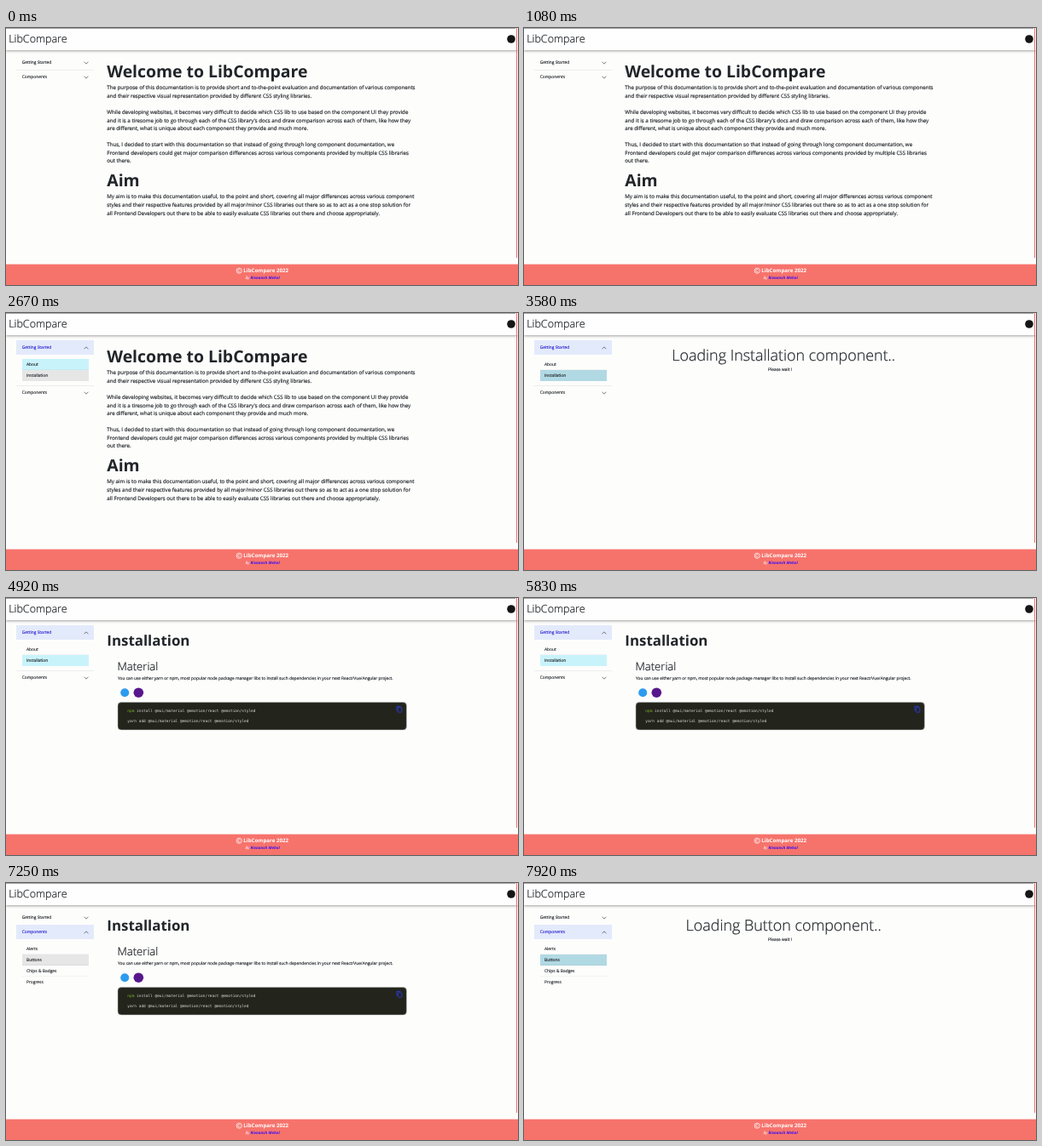
An HTML page for the animation above (8 s loop, 600 by 302 pixels).

```html
<!DOCTYPE html>
<html lang="en">
<head>
<meta charset="utf-8">
<title>LibCompare</title>
<style>
html, body { margin: 0; width: 100%; height: 100%; overflow: hidden; }
body {
  position: relative; background: #fdfdfc; color: #212529;
  font-family: "Open Sans", "Noto Sans", sans-serif; text-rendering: geometricPrecision;
}
.bar {
  position: absolute; left: 0; top: 0; width: 600px; height: 26px;
  background: #fefefe; box-shadow: 0 1px 3px rgba(0, 0, 0, .38);
}
.stage { position: absolute; left: 0; top: 0; width: 600px; height: 302px; }
.body, .small, .light { stroke: #212529; stroke-width: .16; }
.body { font-size: 6.18px; }
.small { font-size: 4.86px; }
.big { font-size: 19.4px; font-weight: 700; }
.title { font-size: 16.9px; font-weight: 700; }
.light { font-weight: 300; stroke-width: .22; }
.mid { text-anchor: middle; }
.code { font: 4.46px "DejaVu Sans Mono", monospace; fill: #dcdcd6; }

.side {
  position: absolute; left: 12px; top: 32px; width: 91px;
  font-size: 4.9px; -webkit-text-stroke: .14px;
}
.first { box-shadow: 0 1px #ededed; }
.head { position: relative; height: 17px; line-height: 18px; padding-left: 6.7px; }
.chev { position: absolute; left: 78.7px; top: 5.5px; width: 6px; height: 6px; }
.chev path { fill: none; stroke: #333; stroke-width: .65; }
.panel { height: 0; overflow: hidden; }
.list { padding: 5px 6px 5px 7px; }
.item { height: 13px; line-height: 14px; padding-left: 5px; }
.item:not(:last-child) { box-shadow: inset 0 -1px rgba(0, 0, 0, .04); }
.ring { position: absolute; left: 0; right: 0; opacity: 0; border-top: 1px dashed #9a9ac6; }
.low { bottom: 0; }
.high { top: 0; }
</style>
</head>
<body>
<div class="bar"></div>

<svg class="stage" viewBox="0 0 600 302" fill="#212529">
  <rect width="597" height="1" fill="#a2a2a2"/>
  <rect x="598" width="1" height="270" fill="#f0716e"/>
  <text class="light" x="3.2" y="16.8" font-size="12.5">LibCompare</text>
  <circle cx="592" cy="13" r="4.8" fill="#151515"/>

  <g id="about">
    <text class="big" x="118.3" y="58">Welcome to LibCompare</text>
    <text class="big" x="118.3" y="185.8">Aim</text>
  </g>

  <g id="wait" class="mid">
    <text id="waitInstall" class="light" x="304.2" y="55.8" font-size="17.9">Loading Installation component..</text>
    <text id="waitButton" class="light" x="304.2" y="55.8" font-size="17.9">Loading Button component..</text>
    <text class="small" x="300" y="68">Please wait !</text>
  </g>

  <g id="install">
    <text class="title" x="118.3" y="55.5">Installation</text>
    <text class="light" x="130.5" y="84.8" font-size="13.1">Material</text>
    <text class="small" x="131" y="96.2">You can use either yarn or npm, most popular node package manager libs to install such dependencies in your next React/Vue/Angular project.</text>
    <circle cx="139.2" cy="111.2" r="5" fill="#2c9bee"/>
    <circle cx="155.3" cy="111.2" r="5.8" fill="#57178c"/>
    <rect x="131" y="122.6" width="338.4" height="32.4" rx="4" fill="#23251d" stroke="#b9b9b5" stroke-width=".5"/>
    <text class="code" x="142.3" y="133.8"><tspan fill="#7fba22">npm</tspan> install @mui/material @emotion/react @emotion/styled</text>
    <text class="code" x="142.3" y="146.4">yarn add @mui/material @emotion/react @emotion/styled</text>
    <g fill="none" stroke="#2c3fe6" stroke-width=".8">
      <rect x="459.4" y="128.8" width="4.4" height="5.4" rx=".5"/>
      <path d="M458 132.8V127.4H462.6"/>
    </g>
  </g>

  <rect y="277.6" width="600" height="24.4" fill="#f6736c"/>
  <g fill="none" stroke="#fff" stroke-width=".75">
    <circle cx="273.2" cy="285.2" r="3.1"/>
    <path d="M274.4 284.3A1.5 1.5 0 1 0 274.4 286.1"/>
  </g>
  <text x="278.3" y="287.2" font-size="6.18" font-weight="700" fill="#fff">LibCompare 2022</text>
  <text class="mid" x="300.7" y="294.5" font-size="4.6" font-style="italic" fill="#fff">By <tspan font-weight="700" fill="#3d12f4">Rivaansh Mehol</tspan></text>
</svg>

<div class="side">
  <div class="first">
    <div class="head" id="startHead">Getting Started
      <svg class="chev" id="startChev" viewBox="0 0 6 6"><path d="M.5 1.7L3 4.2L5.5 1.7"/></svg>
      <i class="ring low" id="startRing"></i>
    </div>
    <div class="panel" id="startPanel"><div class="list">
      <div class="item" id="itemAbout">About</div>
      <div class="item" id="itemInstall">Installation</div>
    </div></div>
  </div>
  <div>
    <div class="head" id="compHead">Components
      <svg class="chev" id="compChev" viewBox="0 0 6 6"><path d="M.5 1.7L3 4.2L5.5 1.7"/></svg>
      <i class="ring high" id="compRingTop"></i>
      <i class="ring low" id="compRing"></i>
    </div>
    <div class="panel" id="compPanel"><div class="list">
      <div class="item" id="itemAlerts">Alerts</div>
      <div class="item" id="itemButtons">Buttons</div>
      <div class="item">Chips &amp; Badges</div>
      <div class="item">Progress</div>
    </div></div>
  </div>
</div>

<script>
const LOOP = 8000;
const OPEN = 1310, HOVER = 2250, PICK = 2980, LOADED = 3920, LEAVE = 4100;
const SWITCH = 6445, NEXT = 6640, PRESS = 7450;
const NONE = 'rgba(0,0,0,0)', ACTIVE = '#c9f3fb', GREY = '#e6e6e6', TEAL = '#b1d9e4';
const HEAD = '#e3eafb', INK = '#212529', BLUE = '#2a23cf';
const $ = id => document.getElementById(id);

// Paragraph lines; an empty string leaves a blank line.
function para(y, lines) {
  lines.forEach((line, i) => {
    if (!line) return;
    const el = document.createElementNS('http://www.w3.org/2000/svg', 'text');
    el.setAttribute('class', 'body');
    el.setAttribute('x', 118.3);
    el.setAttribute('y', y + i * 9.55);
    el.textContent = line;
    $('about').append(el);
  });
}
para(72.4, [
  'The purpose of this documentation is to provide short and to-the-point evaluation and documentation of various components',
  'and their respective visual representation provided by different CSS styling libraries.',
  '',
  'While developing websites, it becomes very difficult to decide which CSS lib to use based on the component UI they provide',
  'and it is a tiresome job to go through each of the CSS library\'s docs and draw comparison across each of them, like how they',
  'are different, what is unique about each component they provide and much more.',
  '',
  'Thus, I decided to start with this documentation so that instead of going through long component documentation, we',
  'Frontend developers could get major comparison differences across various components provided by multiple CSS libraries',
  'out there.'
]);
para(200.4, [
  'My aim is to make this documentation useful, to the point and short, covering all major differences across various component',
  'styles and their respective features provided by all major/minor CSS libraries out there so as to act as a one stop solution for',
  'all Frontend Developers out there to be able to easily evaluate CSS libraries out there and choose appropriately.'
]);

// Steps are [time, value, easing to the next step]; values hold by default.
function track(id, prop, steps) {
  const last = steps[steps.length - 1];
  const frames = [...steps, [LOOP, last[1]]].map(([t, value, easing = 'step-end']) =>
    ({ offset: t / LOOP, [prop]: value, easing }));
  $(id).animate(frames, { duration: LOOP, iterations: Infinity });
}

// Values change at the given times, each over the same span.
function ease(id, prop, first, changes, span, easing) {
  const steps = [[0, first]];
  let now = first;
  for (const [t, value] of changes) {
    steps.push([t, now, easing], [t + span, value]);
    now = value;
  }
  track(id, prop, steps);
}

function fold(name, height, flips) {
  const to = (off, on) => flips.map(([t, open]) => [t, open ? on : off]);
  ease(name + 'Panel', 'height', '0px', to('0px', height + 'px'), 350, 'ease');
  ease(name + 'Chev', 'transform', 'rotate(0deg)', to('rotate(0deg)', 'rotate(-180deg)'), 200, 'ease-in-out');
  ease(name + 'Head', 'backgroundColor', 'rgba(227,234,251,0)', to('rgba(227,234,251,0)', HEAD), 130, 'ease-in-out');
  ease(name + 'Head', 'color', INK, to(INK, BLUE), 130, 'ease-in-out');
}
fold('start', 36, [[OPEN, true], [SWITCH, false]]);
fold('comp', 62, [[SWITCH, true]]);

const show = (id, from, to) =>
  track(id, 'opacity', from ? [[0, 0], [from, 1], [to, 0]] : [[0, 1], [to, 0]]);
show('startRing', OPEN + 60, 1830);
show('compRingTop', SWITCH + 40, 6830);
show('compRing', SWITCH + 40, 6830);
show('about', 0, PICK);
show('waitInstall', PICK, LOADED);
show('install', LOADED, PRESS);
track('waitButton', 'opacity', [[0, 0], [PRESS, 1]]);
track('wait', 'opacity', [[0, 0], [PICK, 1], [LOADED, 0], [PRESS, 1]]);

const tint = (id, steps) => track(id, 'backgroundColor', steps);
tint('itemAbout', [[0, ACTIVE], [PICK, NONE]]);
tint('itemInstall', [[0, NONE], [HOVER, GREY], [PICK, TEAL], [LEAVE, ACTIVE], [SWITCH + 20, NONE]]);
tint('itemAlerts', [[0, NONE], [SWITCH + 60, '#f3f3f3'], [NEXT, NONE]]);
tint('itemButtons', [[0, NONE], [NEXT, GREY], [PRESS, TEAL]]);
</script>
</body>
</html>
```
